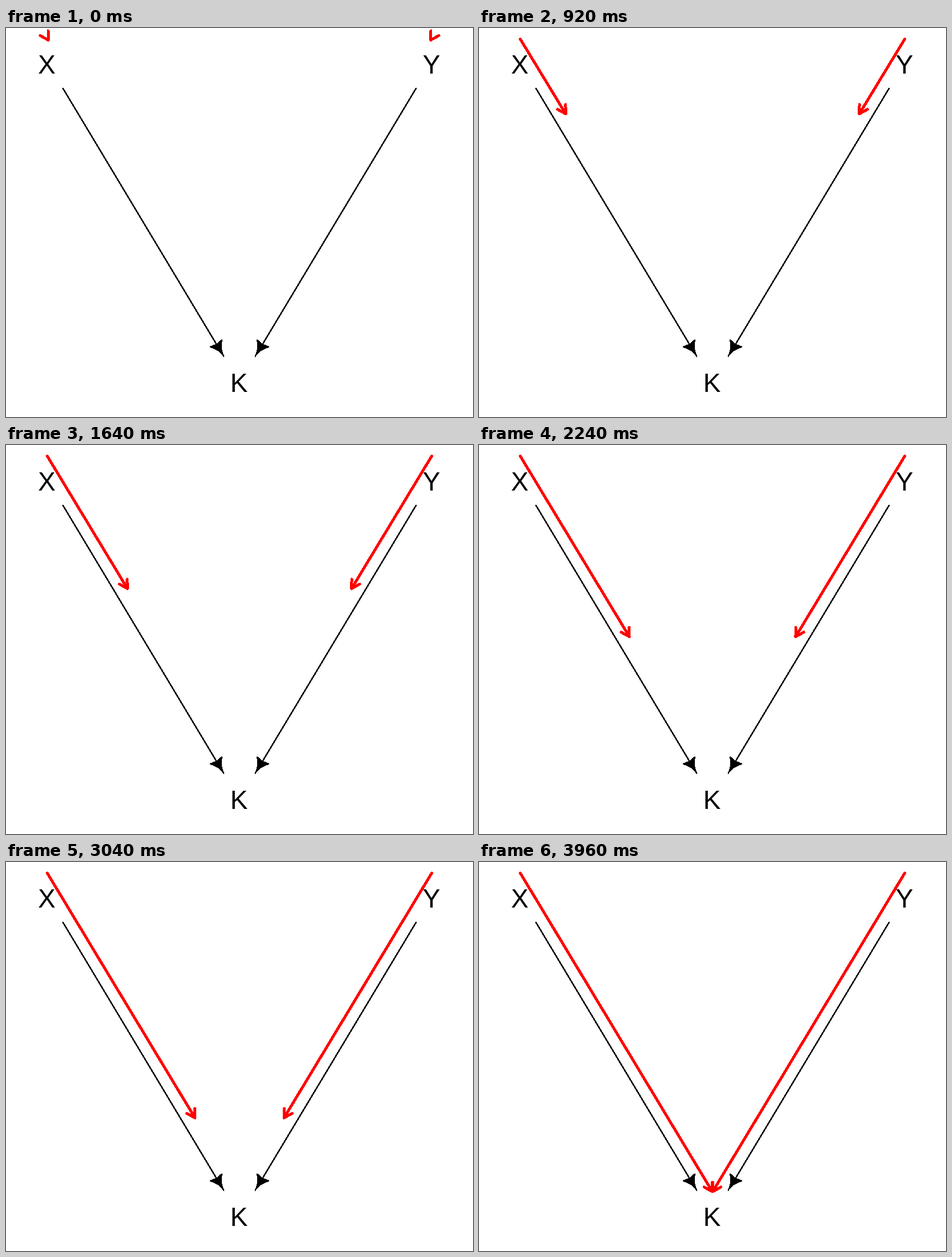
Recreate the animation shown at these times as an HTML page. Size 820 by 683 pixels, loop 4000 ms.

```html
<!DOCTYPE html>
<html lang="en">
<head>
<meta charset="utf-8">
<title>X, Y, K</title>
<style>
  html, body { margin: 0; width: 100%; height: 100%; overflow: hidden; background: #fff; }
  svg { display: block; width: 100%; height: 100%; }
  text { font: 46px "Liberation Sans", Arial, sans-serif; text-anchor: middle; }
  path { shape-rendering: crispEdges; stroke-linecap: round; stroke-linejoin: round; }
  .edge { stroke: #000; stroke-width: 2.6; }
  .head { stroke: #000; stroke-width: 2; }
  .flow { fill: none; stroke: #f00; stroke-width: 5; }
</style>
</head>
<body>
<svg viewBox="0 0 820 683">
  <defs>
    <g id="edge">
      <path class="edge" d="M100 106L379 571"/>
      <path class="head" transform="translate(382.5 576.5) rotate(59)"
            d="M0 0Q-13 0 -26.6 11.8L-24.5 0L-26.6 -11.8Q-13 0 0 0Z"/>
    </g>
    <path id="flow" class="flow"/>
  </defs>
  <use href="#edge"/>
  <use href="#edge" transform="matrix(-1 0 0 1 820 0)"/>
  <text x="71.5" y="80">X</text>
  <text x="747" y="80">Y</text>
  <text x="409" y="639">K</text>
  <use href="#flow"/>
  <use href="#flow" transform="matrix(-1 0 0 1 820 0)"/>
</svg>
<script>
  const STEP = 40, STEPS = 100;
  const START = [72.5, 19.5], FIRST = [74.3, 21.2], MOVE = [3.388, 5.632];
  const BARB = 16.3, SPREAD = Math.PI / 6;
  const angle = Math.atan2(MOVE[1], MOVE[0]);
  const flow = document.getElementById("flow");

  const barb = ([x, y], a) => [x - BARB * Math.cos(a), y - BARB * Math.sin(a)];

  function draw(ms) {
    const n = Math.floor(ms / STEP) % STEPS;
    const tip = FIRST.map((v, k) => v + n * MOVE[k]);
    const left = barb(tip, angle - SPREAD), right = barb(tip, angle + SPREAD);
    flow.setAttribute("d", `M${START}L${tip}M${left}L${tip}L${right}`);
  }

  const began = performance.now();
  function tick() {
    draw(performance.now() - began);
    requestAnimationFrame(tick);
  }
  tick();
</script>
</body>
</html>
```
